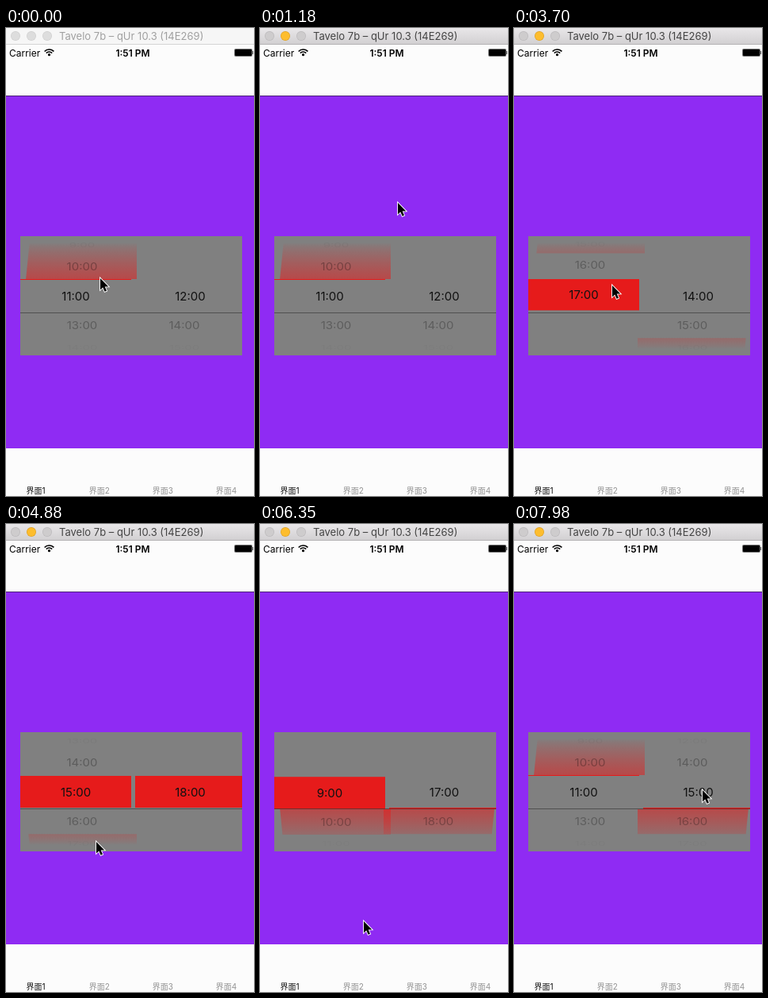
Animation, 313 px wide and 589 px high, one loop 8 s. Source, as an HTML page with a canvas:

```html
<!DOCTYPE html>
<html lang="zh">
<head>
<meta charset="utf-8">
<style>
  html, body { margin: 0; width: 100%; height: 100%; overflow: hidden; background: #fcfcfc; }
  canvas { display: block; width: 313px; height: 589px; }
</style>
</head>
<body>
<canvas id="stage"></canvas>
<script>
const LOOP = 8000, TICK = 147.5, W = 313, H = 589;
const SANS = 'Inter, "Noto Sans CJK SC", "Noto Sans CJK", sans-serif';
const canvas = document.getElementById('stage');
const ctx = canvas.getContext('2d');
const dpr = window.devicePixelRatio || 1;
canvas.width = W * dpr;
canvas.height = H * dpr;

// All motion is timed in screen ticks.
const glide = (start, end, rows) => ({ start, end, rows });
const LEFT_GLIDES = [glide(12, 18, 1), glide(20, 25.3, 4), glide(27, 33, -2),
                     glide(33, 36, 1), glide(36, 43.3, -6), glide(44, 48, 2)];
const RIGHT_GLIDES = [glide(48, 54, 2)];
const stop = (tick, x, y) => ({ tick, x, y });
const POINTER_STOPS = [stop(1, 119, 315), stop(8, 174, 220), stop(11, 174, 220),
  stop(14, 122, 322), stop(17, 121, 279), stop(20, 123, 365), stop(25, 124, 324),
  stop(33, 114, 400), stop(36, 125, 300), stop(43, 131, 500), stop(50, 233, 375),
  stop(54, 238, 335)];

const START_ROW = 2;
const HOURS = [9, 10, 11, 13, 14, 15, 16, 17];
const isBusy = row => [9, 10, 15, 17].includes(HOURS[row]);
const RED = '230,27,27';
const MID = 337, ROW = 40, RADIUS = 75, ANGLE = 0.52;

const clamp = (v, lo = 0, hi = 1) => Math.max(lo, Math.min(hi, v));
const smooth = u => u * u * (3 - 2 * u);

// A glide runs slightly past its row, then springs back.
function rowAt(glides, from, n) {
  return glides.reduce((row, { start, end, rows }) => {
    const u = clamp((n - start) / (end - start));
    const spring = 0.12 * Math.sin(Math.PI * clamp(2 * u - 1));
    return row + rows * smooth(clamp(u / 0.75)) + Math.sign(rows) * spring;
  }, from);
}

// The right wheel starts at the first free row from where the left one last settled.
function firstRightRow(n) {
  const settled = LEFT_GLIDES.filter(g => g.end < n).reduce((row, g) => row + g.rows, START_ROW);
  const free = HOURS.findIndex((_, row) => row >= settled && !isBusy(row));
  return free < 0 ? settled : free;
}

function pointerAt(n) {
  const i = POINTER_STOPS.findIndex(p => p.tick > n);
  const b = POINTER_STOPS.at(i), a = POINTER_STOPS[Math.max(0, i - 1)];
  if (i <= 0) return b;
  const u = smooth((n - a.tick) / (b.tick - a.tick));
  return { x: a.x + (b.x - a.x) * u, y: a.y + (b.y - a.y) * u };
}

function rect(x, y, w, h, color) {
  ctx.fillStyle = color;
  ctx.fillRect(x, y, w, h);
}

function rounded(x, y, w, h, r, color) {
  ctx.fillStyle = color;
  ctx.beginPath();
  ctx.roundRect(x, y, w, h, r);
  ctx.fill();
}

const disc = (x, y, r, color) => rounded(x - r, y - r, 2 * r, 2 * r, r, color);

function text(str, x, y, size, color, align = 'center', weight = 400) {
  ctx.font = `${weight} ${size}px ${SANS}`;
  ctx.textAlign = align;
  ctx.fillStyle = color;
  ctx.fillText(str, x, y);
}

function clipped(y, h, draw) {
  ctx.save();
  ctx.beginPath();
  ctx.rect(18, y, 280, h);
  ctx.clip();
  draw();
  ctx.restore();
}

function titleBar(active) {
  const bg = ctx.createLinearGradient(0, 0, 0, 20);
  bg.addColorStop(0, active ? '#e9e7e9' : '#f6f6f6');
  bg.addColorStop(1, active ? '#d2d0d2' : '#f6f6f6');
  rect(0, 0, W, 20, bg);
  rect(0, 20, W, 1, active ? '#b4b2b4' : '#d4d4d4');
  for (let i = 0; i < 3; i++) {
    const lit = active && i === 1;
    disc(12 + 20 * i, 10, 6, lit ? '#dfa023' : active ? '#bbb9bb' : '#cfcfcf');
    disc(12 + 20 * i, 10, 5.3, lit ? '#fdbd2e' : active ? '#cecccd' : '#dddddd');
  }
  text('Tavelo 7b – qUr 10.3 (14E269)', 67, 15, 13, active ? '#444' : '#a0a0a0', 'left');
}

function statusBar() {
  text('Carrier', 4, 35.5, 12, '#000', 'left');
  text('1:51 PM', 160, 35.5, 12, '#000', 'center', 600);
  ctx.strokeStyle = '#000';
  ctx.lineWidth = 1.7;
  for (const r of [8, 5]) {
    ctx.beginPath();
    ctx.arc(54.5, 35, r, -Math.PI * 0.76, -Math.PI * 0.24);
    ctx.stroke();
  }
  disc(54.5, 33.7, 1.6, '#000');
  rounded(288, 26, 23, 10, 2, '#777');
  rounded(289, 27, 21, 8, 1, '#000');
  rect(311, 29, 1, 4, '#555');
}

// Opacity of a row by its distance from the middle of the wheel.
const fade = d => 0.55 * clamp((67 - d) / 47) ** 0.8;

function fadingRed() {
  const g = ctx.createLinearGradient(0, MID - 67, 0, MID + 67);
  for (let u = 0; u <= 1; u += 1 / 32) {
    g.addColorStop(u, `rgba(${RED},${fade(Math.abs(2 * u - 1) * 67)})`);
  }
  return g;
}

const wheelY = offset => MID + 0.5 + RADIUS * Math.sin(clamp(offset * ANGLE, -1.5, 1.5));

function outerBand(offset, { inner, outer }) {
  const y1 = wheelY(offset - 0.5), y2 = wheelY(offset + 0.5);
  const edge = y => outer + Math.sign(inner - outer) * 0.1 * (Math.abs(y - MID) - 20);
  ctx.fillStyle = fadingRed();
  ctx.beginPath();
  ctx.moveTo(inner, y1);
  ctx.lineTo(edge(y1), y1);
  ctx.lineTo(edge(y2), y2);
  ctx.lineTo(inner, y2);
  ctx.fill();
}

function outerLabel(label, x, offset) {
  const y = wheelY(offset);
  ctx.save();
  ctx.translate(x, y);
  ctx.scale(1, Math.cos(offset * ANGLE));
  text(label, 0, 5.4, 15, `rgba(0,0,0,${fade(Math.abs(y - MID)) * 0.75})`);
  ctx.restore();
}

function wheel(pos, first, hourShift, col) {
  const rows = HOURS.map((hour, i) => ({ label: `${hour + hourShift}:00`, busy: isBusy(i), offset: i - pos }))
    .slice(first);
  const outside = () => {
    for (const { label, busy, offset } of rows) {
      if (Math.abs(offset) > 2.8) continue;
      if (busy) outerBand(offset, col);
      outerLabel(label, col.outerText, offset);
    }
  };
  clipped(262, 54, outside);
  clipped(359, 53, outside);
  clipped(316, 43, () => {
    for (const { label, busy, offset } of rows) {
      const y = MID + offset * ROW;
      if (busy) rect(col.x, y - ROW / 2, col.w, ROW, `rgb(${RED})`);
      text(label, col.text, y + 6, 15, '#111');
    }
  });
}

const LEFT_COL = { x: 18, w: 140, text: 88, outerText: 96, outer: 25, inner: 165 };
const RIGHT_COL = { x: 163, w: 135, text: 232.5, outerText: 225, outer: 296, inner: 156 };

function picker(n) {
  const first = firstRightRow(n);
  rect(18, 262, 280, 150, '#808080');
  wheel(rowAt(LEFT_GLIDES, START_ROW, n), 0, 0, LEFT_COL);
  wheel(rowAt(RIGHT_GLIDES, first, n), first, 1, RIGHT_COL);
  rect(18, 358, 280, 1, 'rgba(55,55,55,.65)');
}

const ARROW = new Path2D('M0 0V14.5L3.3 11.4 5.6 16.8 8 15.8 5.7 10.6 10.3 10.4Z');

function pointer({ x, y }) {
  ctx.save();
  ctx.translate(x, y);
  ctx.lineWidth = 1.8;
  ctx.strokeStyle = '#fff';
  ctx.stroke(ARROW);
  ctx.fillStyle = '#000';
  ctx.fill(ARROW);
  ctx.restore();
}

function render(now) {
  const n = Math.floor((now % LOOP) / TICK);
  ctx.setTransform(dpr, 0, 0, dpr, 0, 0);
  rect(0, 0, W, H, '#fcfcfc');
  titleBar(n > 0);
  statusBar();
  rect(0, 85, W, 444, '#8f2bf3');
  rect(0, 85, W, 1, '#4b2278');
  picker(n);
  for (let i = 0; i < 4; i++) {
    text(`界面${i + 1}`, 37.5 + 80.2 * i, 585.5, 10, i ? '#929292' : '#111');
  }
  pointer(pointerAt(n));
  requestAnimationFrame(render);
}
requestAnimationFrame(render);
</script>
</body>
</html>
```
